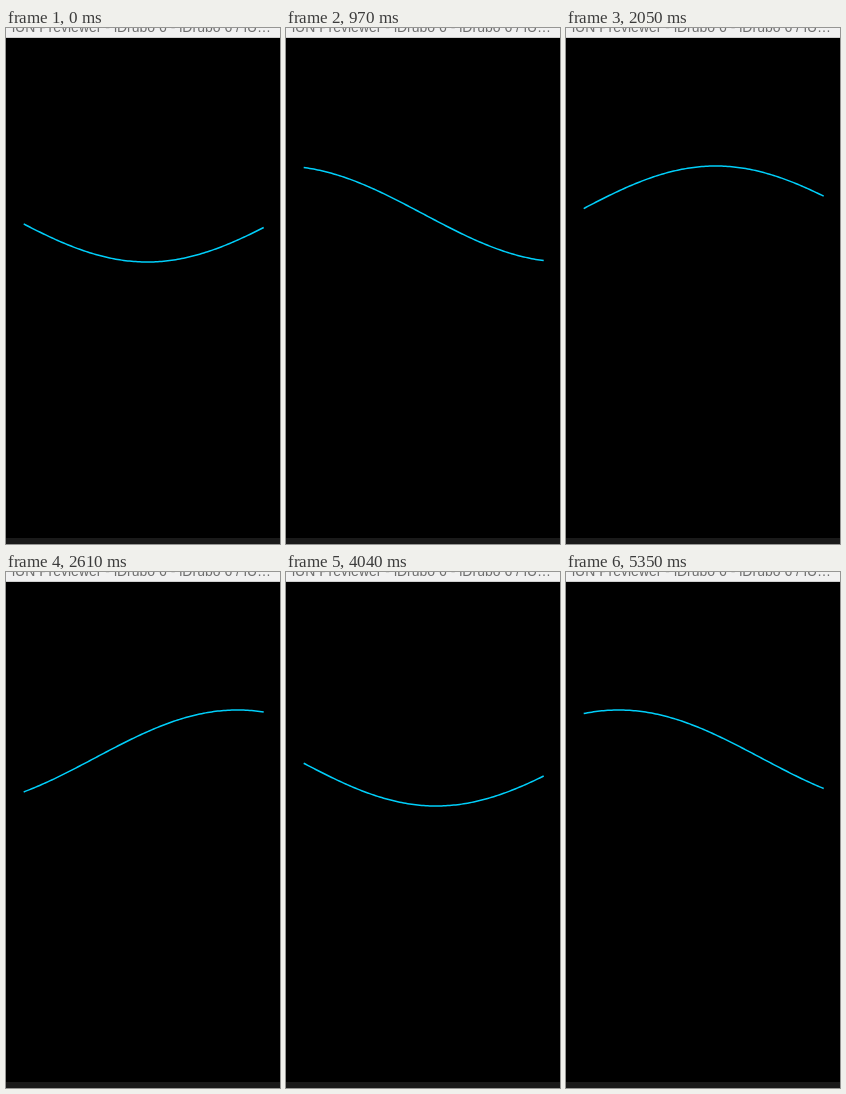
Recreate the animation shown at these times as an HTML page. Size 274 by 516 pixels, loop 5390 ms.

```html
<!DOCTYPE html>
<html lang="en">
<head>
<meta charset="utf-8">
<title>Sine wave</title>
<style>
  html, body { margin: 0; width: 100%; height: 100%; overflow: hidden; background: #000; }
  svg { display: block; }
  text { font: 14px "Liberation Sans", Arial, sans-serif; fill: #6e6e6e; }
</style>
</head>
<body>
<svg width="274" height="516" viewBox="0 0 274 516">
  <rect width="274" height="516" fill="#000"/>
  <rect width="274" height="9" fill="#f1f1f1"/>
  <rect y="9" width="274" height="1" fill="#cfcfcf"/>
  <text x="6" y="4">lUN Previewer - lDrubo 6 - lDrubo 6 / lU…</text>
  <rect y="510" width="274" height="6" fill="#1a1a1a"/>
  <path id="wave" fill="none" stroke="#00cffa" stroke-width="1.5"/>
</svg>
<script>
const LOOP = 5390;
const STEPS = 95;       // redraws per loop, evenly spaced
const LEFT = 17.7, WIDTH = 240;
const MID = 186, AMP = 48;
const K = 0.01103;      // radians per pixel
const PHASE = 1.362;    // at the start of the loop
const TURN = 0.0899;    // radians per redraw

const wave = document.getElementById("wave");

function wavePath(step) {
  const points = [];
  for (let dx = 0; dx <= WIDTH; dx += 2) {
    const y = MID + AMP * Math.cos(K * dx - PHASE - TURN * step);
    points.push((LEFT + dx).toFixed(2) + " " + y.toFixed(2));
  }
  return "M" + points.join("L");
}

function draw(time) {
  const step = Math.floor(time % LOOP / LOOP * STEPS);
  wave.setAttribute("d", wavePath(step));
}

const start = performance.now();
function tick() {
  draw(performance.now() - start);
  requestAnimationFrame(tick);
}
draw(0);
requestAnimationFrame(tick);
</script>
</body>
</html>
```
